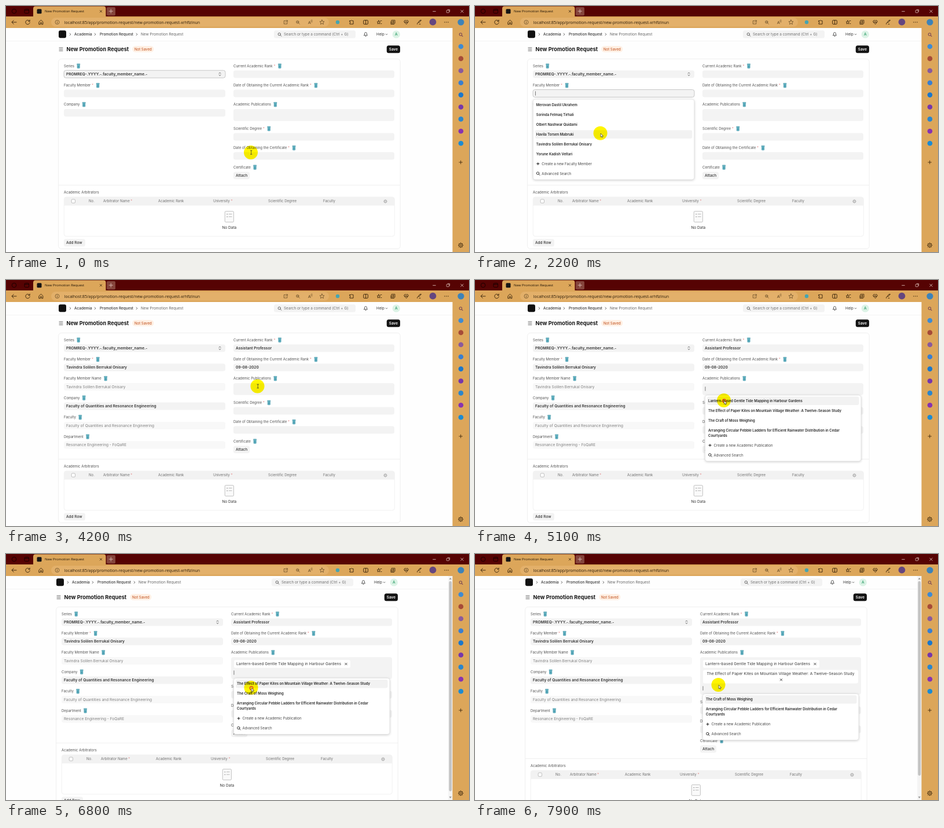
An HTML page with a canvas for the animation above (8 s loop, 800 by 425 pixels).

```html
<!DOCTYPE html>
<html lang="en">
<head>
<meta charset="utf-8">
<title>New Promotion Request</title>
<style>
html, body { margin: 0; width: 100%; height: 100%; overflow: hidden; background: #fff; }
canvas { display: block; width: 800px; height: 425px; }
</style>
</head>
<body>
<canvas id="stage"></canvas>
<script>
const canvas = document.getElementById('stage');
const c = canvas.getContext('2d');
const dpr = window.devicePixelRatio || 1;
canvas.width = 800 * dpr;
canvas.height = 425 * dpr;

const LOOP = 8000;
const PERSON = 'Tavindra Solilen Berrukal Onisary';
const FACULTY = 'Faculty of Quantities and Resonance Engineering';
const PAPERS = [
  ['Lantern-based Gentle Tide Mapping in Harbour Gardens'],
  ['The Effect of Paper Kites on Mountain Village Weather: A Twelve-Season Study'],
  ['The Craft of Moss Weighing'],
  ['Arranging Circular Pebble Ladders for Efficient Rainwater Distribution in Cedar', 'Courtyards']
];
const PEOPLE = [['Merovan Dastil Ukrahem'], ['Sorinda Felmaq Tirhali'], ['Olbert Nashwar Quidami'],
  ['Havila Torsen Mabruki'], [PERSON], ['Yorune Kadish Veltari']];

// Pointer positions: time, x, y
const PATH = [[0, 423, 253], [100, 420, 250], [700, 221, 151], [1700, 221, 151], [2400, 215.5, 236.5],
  [3050, 215.5, 236.5], [3300, 340, 180], [3500, 430, 152], [3600, 446, 163], [3800, 434.5, 183.5],
  [4500, 434.5, 183.5], [5000, 430, 208], [5300, 430, 208], [5700, 429, 201.5], [6100, 429, 201.5],
  [6600, 423.5, 231], [7000, 423.5, 231], [7500, 420.5, 226], [8000, 420.5, 226]];
const CLICKS = [700, 2400, 3850, 5050, 6750];

const between = (t, a, b) => t >= a && t < b;

function pointerAt(t) {
  const i = PATH.findIndex(p => p[0] > t);
  const [t0, x0, y0] = PATH[i - 1], [t1, x1, y1] = PATH[i];
  const k = (t - t0) / (t1 - t0), e = k * k * (3 - 2 * k);
  return { x: x0 + (x1 - x0) * e, y: y0 + (y1 - y0) * e };
}

function text(str, x, y, size = 6.06, color = '#525252', weight = 400, align = 'left', family = 'Inter') {
  c.font = `${weight} ${size}px "${family}", sans-serif`;
  c.fillStyle = color;
  c.textAlign = align;
  c.fillText(str, x, y + size * 0.36);
  return c.measureText(str).width;
}

function box(x, y, w, h, r, fill, stroke, lw = 0.7) {
  c.beginPath();
  c.roundRect(x, y, w, h, r);
  if (fill) { c.fillStyle = fill; c.fill(); }
  if (stroke) { c.strokeStyle = stroke; c.lineWidth = lw; c.stroke(); }
}

const dot = (x, y, r, fill, stroke, lw) => box(x - r, y - r, 2 * r, 2 * r, r, fill, stroke, lw);

function icon(d, x, y, color = '#33200a', lw = 0.8, fill) {
  const path = new Path2D(d);
  c.save();
  c.translate(x, y);
  c.lineWidth = lw;
  c.lineCap = c.lineJoin = 'round';
  if (fill) { c.fillStyle = fill; c.fill(path); }
  c.strokeStyle = color;
  c.stroke(path);
  c.restore();
}

const GLASS = 'M2 0A2.2 2.2 0 1 1 -2.4 0A2.2 2.2 0 1 1 2 0M1.4 1.6L3.3 3.5';
const CROSS = 'M-1.7-1.7L1.7 1.7M1.7-1.7L-1.7 1.7';
const STAR = 'M0-4L1.2-1.3L4-1.1L1.9.8L2.5 3.6L0 2.1L-2.5 3.6L-1.9.8L-4-1.1L-1.2-1.3Z';
const RIGHT = 'M-1-1.8L1 0L-1 1.8';

function gear(x, y, r, color, lw) {
  dot(x, y, r * 0.35, null, color, lw);
  dot(x, y, r * 0.78, null, color, lw);
  for (let a = 0; a < 8; a++) {
    const u = Math.cos(a * Math.PI / 4), v = Math.sin(a * Math.PI / 4);
    icon(`M${u * r * 0.8} ${v * r * 0.8}L${u * r} ${v * r}`, x, y, color, lw);
  }
}

function label(str, x, y, required) {
  let end = x + text(str, x, y);
  if (required) {
    text('*', end + 1.7, y, 6.06, '#e58a8a');
    end += 5;
  }
  const ix = end + 7.3;
  box(ix - 2.2, y - 2, 4.4, 6, 0.8, '#62b6c6', '#3f8ea2', 0.5);
  box(ix - 2.7, y - 3.7, 5.4, 1.7, 0.5, '#6fc0cd', '#3b7f92', 0.4);
  icon('M-.8 0L.8 1.8M.8 0L-.8 1.8', ix, y + 0.3, '#2f6b80', 0.5);
}

function input(x, y, value = '', { readonly, focus, h = 13 } = {}) {
  const w = x < 300 ? 279 : 278;
  box(x, y - 6.5, w, h, 3.5, readonly ? '#f8f8f8' : '#f3f3f3', focus && '#c2c2c2', 0.9);
  return text(value, x + 4, y, 6.55, readonly ? '#808080' : '#343434', readonly ? 400 : 600);
}

function caret(x, y) {
  c.fillStyle = '#444';
  c.fillRect(x, y - 3.7, 0.7, 7.4);
}

function popup(x, y, w, options, createText, pointer) {
  const rows = [...options, [createText], ['Advanced Search']];
  const height = row => 17 + (row.length - 1) * 9;
  const total = rows.reduce((sum, row) => sum + height(row), 3);
  c.save();
  c.shadowColor = 'rgba(0,0,0,.22)';
  c.shadowBlur = 4 * dpr;
  c.shadowOffsetY = dpr;
  box(x, y, w, total, 4, '#fff');
  c.restore();
  box(x, y, w, total, 4, null, '#dcdcdc', 0.6);
  let top = y + 1.5;
  rows.forEach((row, i) => {
    const h = height(row), mid = top + 8;
    const active = pointer.y < y + 1.5 ? i === 0 : between(pointer.y, top, top + h);
    if (active) box(x + 3.5, top + 1, w - 7, h - 2.5, 3, '#f2f2f2');
    if (i < options.length) {
      row.forEach((line, n) => text(line, x + 5.5, mid + n * 9, 6, '#262626', 600));
    } else {
      const create = i === options.length;
      icon(create ? 'M-2 0H2M0-2V2' : GLASS, x + 8.5, mid - (create ? 0 : 0.5), '#222', create ? 1.1 : 0.9);
      text(row[0], x + 15, mid, 6.1, '#444');
    }
    top += h;
  });
}

function header() {
  c.fillStyle = '#f1f1f1';
  c.fillRect(-10, 60, 790, 0.7);
  box(91, 42.3, 13, 13, 3, '#111');
  [111, 154, 226].forEach(x => icon(RIGHT, x, 49, '#555', 0.8));
  text('Academia', 118, 49, 6.45, '#333', 500);
  text('Promotion Request', 162, 49, 6.4, '#333', 500);
  text('New Promotion Request', 233, 49, 6.45, '#666');
  box(463, 42.3, 141, 13.2, 3.5, '#f3f3f3');
  icon(GLASS, 472.5, 48.7, '#444', 0.8);
  text('Search or type a command (Ctrl + G)', 480, 49, 6.4, '#707070');
  icon('M-3 2H3L2 .5V-1A2 2 0 0 0 -2-1V.5ZM-.8 3.5H.8', 621.5, 48.7, '#333', 0.8);
  text('Help', 640, 49, 6.3, '#333');
  icon('M-1.5-.7L0 .8L1.5-.7', 657.5, 49, '#333', 0.7);
  dot(674.3, 49, 6.6, '#dcf3e6');
  text('A', 674.3, 49, 6.6, '#2a9a66', 500, 'center');

  icon('M-3-2.7H3M-3 0H3M-3 2.7H3', 95, 74.7, '#444', 0.8);
  text('New Promotion Request', 104.5, 74.7, 9.2, '#171717', 700);
  box(218.3, 69, 37, 10.8, 5.4, '#fff0e4');
  text('Not Saved', 236.8, 74.4, 6.1, '#bd4a14', 400, 'center');
  box(657.8, 68.2, 23.2, 13, 3.5, '#141414');
  text('Save', 669.4, 74.7, 6.4, '#fff', 600, 'center');
}

function tag(str, x, y, w, h, wide) {
  box(x, y, w, h, 3, '#fff');
  text(str, wide ? x + w / 2 : x + 4, y + 6.7, 6.8, '#3c3c3c', 400, wide ? 'center' : 'left');
  icon(CROSS, wide ? x + w / 2 + 1 : x + w - 7.5, y + (wide ? 17 : 7), '#333', 0.9);
}

function leftColumn(t, filled) {
  const X = 100;
  label('Series', X, 103.5);
  input(X, 117.7, 'PROMREQ-.YYYY.-.faculty_member_name.-', { focus: t < 750 });
  icon('M-1.4-1.2L0-2.8L1.4-1.2M-1.4 1.2L0 2.8L1.4 1.2', 369.5, 117.7, '#444', 0.8);
  label('Faculty Member', X, 137, true);
  const focus = between(t, 750, 3800);
  const w = input(X, 151, filled ? PERSON : '', { focus });
  if (focus && !between(t, 1300, 1700)) caret(X + 4 + w, 151);
  if (!filled) {
    label('Company', X, 170);
    input(X, 184.5);
    return;
  }
  [['Faculty Member Name', PERSON, true], ['Company', FACULTY, false], ['Faculty', FACULTY, true],
    ['Department', 'Resonance Engineering - FoQaRE', true]].forEach(([name, value, readonly], i) => {
    label(name, X, 170 + i * 33.5);
    input(X, 184.5 + i * 33.5, value, { readonly });
  });
}

function rightColumn(t, filled, tags, dy) {
  const X = 393;
  label('Current Academic Rank', X, 103.5, true);
  input(X, 117.7, filled ? 'Assistant Professor' : '');
  label('Date of Obtaining the Current Academic Rank', X, 137, true);
  input(X, 151, filled ? '09-08-2020' : '');
  label('Academic Publications', X, 170);
  input(X, 184.7, '', { h: 20.5 + dy });
  if (tags > 0) tag(PAPERS[0][0], 398, 183, 201, 13.7);
  if (tags > 1) tag(PAPERS[1][0], 398, 200.3, 268, 23.2, true);
  if (t >= 4300) caret(397.6, tags > 1 ? 232 : tags ? 205 : 188);
  label('Scientific Degree', X, 211.7 + dy, true);
  input(X, 226 + dy);
  label('Date of Obtaining the Certificate', X, 245 + dy, true);
  input(X, 259 + dy);
  label('Certificate', X, 278.5 + dy);
  box(X, 286.5 + dy, 28, 12.8, 3.5, '#f3f3f3');
  text('Attach', X + 4, 293 + dy, 6.5, '#333', 500);
}

function table(dy) {
  c.save();
  c.translate(0, dy);
  c.fillStyle = '#ededed';
  c.fillRect(90.5, 309.2, 590.5, 0.8);
  text('Academic Arbitrators', 100, 322);
  box(100.3, 330, 571, 68, 4, '#fff', '#ebebeb');
  box(100.3, 330, 571, 14.8, [4, 4, 0, 0], '#f2f2f2');
  box(113.2, 334, 6.3, 6.3, 1.5, '#fff', '#999', 0.6);
  const heads = ['Arbitrator Name', 'Academic Rank', 'University', 'Scientific Degree', 'Faculty'];
  text('No.', 143, 337.3, 6.06, '#707070');
  heads.forEach((head, i) => {
    const x = 168 + i * 95, w = text(head, x, 337.3, 6.06, '#707070');
    if (i === 0 || i === 2) text('*', x + w + 1.7, 337.3, 6.06, '#e58a8a');
  });
  gear(655.5, 337.5, 3, '#888', 0.5);
  box(378.2, 354.7, 15.2, 18.6, 1.5, '#fafafa', '#aaa', 0.7);
  c.fillStyle = '#b0b0b0';
  [359, 363.5].forEach(y => {
    c.fillRect(381, y, 2.5, 1.2);
    c.fillRect(385, y, 5.5, 0.9);
  });
  text('No Data', 385.8, 383, 6.5, '#333', 400, 'center');
  box(100, 402.5, 37, 13, 3.5, '#f3f3f3');
  text('Add Row', 104, 409, 6.5, '#333', 500);
  c.restore();
}

function scrollbar(growth) {
  c.fillStyle = '#f4f4f4';
  c.fillRect(764.3, 38, 7.2, 387);
  box(765.4, 47, 4.8, 380 - growth, 2.4, '#c4c4c4');
  icon('M-1.6 1L0-1.2L1.6 1Z', 767.8, 42.5, '#888', 0.4, '#888');
  icon('M-1.6-1L0 1.2L1.6-1Z', 767.8, 420.5, '#888', 0.4, '#888');
}

function browser() {
  const TAN = '#dca65a', INK = '#33200a', PALE = '#e8cfc8', BROWN = '#5a411f';
  c.fillStyle = '#560303';
  c.fillRect(0, 0, 800, 18);
  c.fillStyle = TAN;
  c.fillRect(0, 18, 800, 20);
  c.fillRect(771.5, 18, 28.5, 407);
  box(47, 0.5, 125.5, 18, [4, 4, 0, 0], TAN);

  dot(14, 9, 3.8, null, '#1d0000', 1);
  box(32, 5.5, 7.5, 7, 1.5, null, '#1d0000', 1);
  icon('M-3.5-1.5H3.5', 36, 9, '#1d0000', 1);
  box(53.5, 5.2, 8, 8, 1.5, '#151515');
  text('New Promotion Request', 67, 9.2, 6, '#1d1206', 400, 'left', 'Open Sans');
  icon(CROSS, 164, 9.2, INK, 0.8);
  box(174, 2, 15, 14.5, 2, '#85443b');
  icon('M-3.3 0H3.3M0-3.3V3.3', 181.3, 9, PALE, 0.8);
  icon('M-2.3 0H2.3', 740, 9.3, PALE, 0.8);
  box(761.2, 7.2, 4.4, 4.4, 0.8, null, PALE);
  icon('M-.8-2.5H2.6V1', 764.1, 8.8, PALE, 0.7);
  icon('M-2.2-2.2L2.2 2.2M2.2-2.2L-2.2 2.2', 788, 9.2, PALE, 0.8);

  icon('M4 0H-4L-.8-3.2M-4 0L-.8 3.2', 14, 28, INK, 0.9);
  icon('M3.3-1.7A3.7 3.7 0 1 0 3.7 .6M3.6-4V-1.6H1.2', 37.5, 28, INK, 0.9);
  icon('M-3.3-.6L0-3.7L3.3-.6V3.7H1V.8H-1V3.7H-3.3Z', 60.5, 28, INK, 0.9);
  box(78, 20.2, 480, 15.6, 7.8, '#e3b06a');
  dot(88.5, 28, 3.5, null, BROWN, 0.7);
  icon('M0-.3V1.8M0-1.8V-1.7', 88.5, 28, BROWN, 0.8);
  text('localhost:85/app/promotion-request/new-promotion-request-xrhfizlnun', 100.8, 28, 7, '#2a1b08', 400, 'left', 'Open Sans');
  icon('M-.5-2.5H-3V3H2.5V.5M.5-3H3V-.5M3-3L-.3 .3', 483.3, 28, BROWN, 0.7);
  icon(GLASS + 'M-1.2 0H.8', 504, 27.7, BROWN, 0.7);
  text('A', 524.3, 28, 7.5, BROWN, 400, 'center', 'Open Sans');
  icon('M0-1Q1 .5 0 2M1.5-2Q3 .5 1.5 3', 527, 25.5, BROWN, 0.5);
  icon(STAR, 546, 28, BROWN, 0.7);
  dot(573, 28, 3.2, '#45a5b2');
  icon('M-3-2.5H-.8A1.2 1.2 0 0 1 1.4-2.5H3V3.2H-3V1.5A1.2 1.2 0 0 0 -3-.9Z', 597, 28, INK, 0.9);
  box(617.8, 24.6, 7.6, 6.8, 1.3, null, INK, 0.9);
  icon('M0-3.4V3.4', 621.6, 28, INK, 0.9);
  icon('M-1-3L0-.8L2-.6L.3 .8L.8 3L-1 1.8L-3 3L-2.4 .7L-4-.6L-2-.8ZM2-2.5H4M2.5 2.5H4', 645, 28, INK, 0.8);
  icon('M-3.5-1V3.5H2M-2-3.5H3.5V2H-2ZM-1-.7H2.5M.7-2.4V1', 668.5, 28, INK, 0.8);
  icon('M0 3.2L-3.2 0A2 2 0 0 1 0-2.4A2 2 0 0 1 3.2 0ZM-2.4 0H-.8L0-1.1L.8 1L1.4 0H2.4', 691.5, 28, INK, 0.9);
  icon('M-3.5 3.3Q-3.5 0 0 .5L3.5-3.5L1-3.3L-1.5 0M0 3.3H2', 714, 28, INK, 0.9);
  dot(737.5, 27.7, 5.9, '#65467f');
  [758, 761, 764].forEach(x => dot(x, 28, 0.7, INK));
  dot(786, 28, 5.6, '#3d83b8');

  icon(GLASS, 785.7, 49, '#7b4a55', 1.1);
  ['#3f8bd2', '#a64b38', '#8a5a9c', '#3a7fd0', '#1b77cb', '#7637ab', '#2b86cc', '#8733b0', '#1c8bd2']
    .forEach((color, i) => dot(786, 70 + i * 20.9, 4.3, color));
  icon('M-2.8 0H2.8M0-2.8V2.8', 785.7, 270, INK, 0.8);
  gear(785.7, 413.3, 4.3, INK, 0.8);
}

function pointerMark(t, p) {
  c.save();
  c.globalCompositeOperation = 'multiply';
  dot(p.x, p.y, 12, '#fff500');
  c.restore();
  if (CLICKS.some(at => between(t, at, at + 180))) dot(p.x + 0.5, p.y + 0.8, 2.8, null, '#e2481c', 1.3);
  if (t < 1750 || between(t, 3400, 4500)) {
    icon('M-1.3-3.2H1.3M0-3.2V3.2M-1.3 3.2H1.3', p.x + 0.7, p.y, '#333', 0.7);
  } else {
    icon('M0 0V5.8L1.4 4.5L2.4 6.7L3.3 6.3L2.4 4.2H4.2Z', p.x + 0.5, p.y + 0.8, '#222', 0.6, '#fff');
  }
}

function draw(t) {
  const filled = t >= 2700;
  const tags = t >= 7000 ? 2 : t >= 5300 ? 1 : 0;
  const dy = [0, 17, 44][tags];
  const p = pointerAt(t);
  c.setTransform(dpr, 0, 0, dpr, 0, 0);
  c.fillStyle = '#fefefe';
  c.fillRect(0, 0, 800, 425);

  c.save();
  c.translate(tags ? -4 : 0, 0);
  header();
  box(90.7, 91.5, 590.5, 328 + dy, 5, '#fff', '#ebebeb', 0.8);
  leftColumn(t, filled);
  rightColumn(t, filled, tags, dy);
  table(dy);
  if (between(t, 1700, 2600)) popup(100.3, 161, 278.5, PEOPLE, 'Create a new Faculty Member', p);
  const listTop = between(t, 4400, 5200) ? 199 : between(t, 6100, 7000) ? 214.5 : t >= 7800 ? 241.5 : 0;
  if (listTop) popup(397.5, listTop, 269.5, PAPERS.slice(tags), 'Create a new Academic Publication', p);
  c.restore();

  if (tags) scrollbar(dy);
  browser();
  pointerMark(t, p);
}

function tick() {
  draw(performance.now() % LOOP);
  requestAnimationFrame(tick);
}
tick();
</script>
</body>
</html>
```
